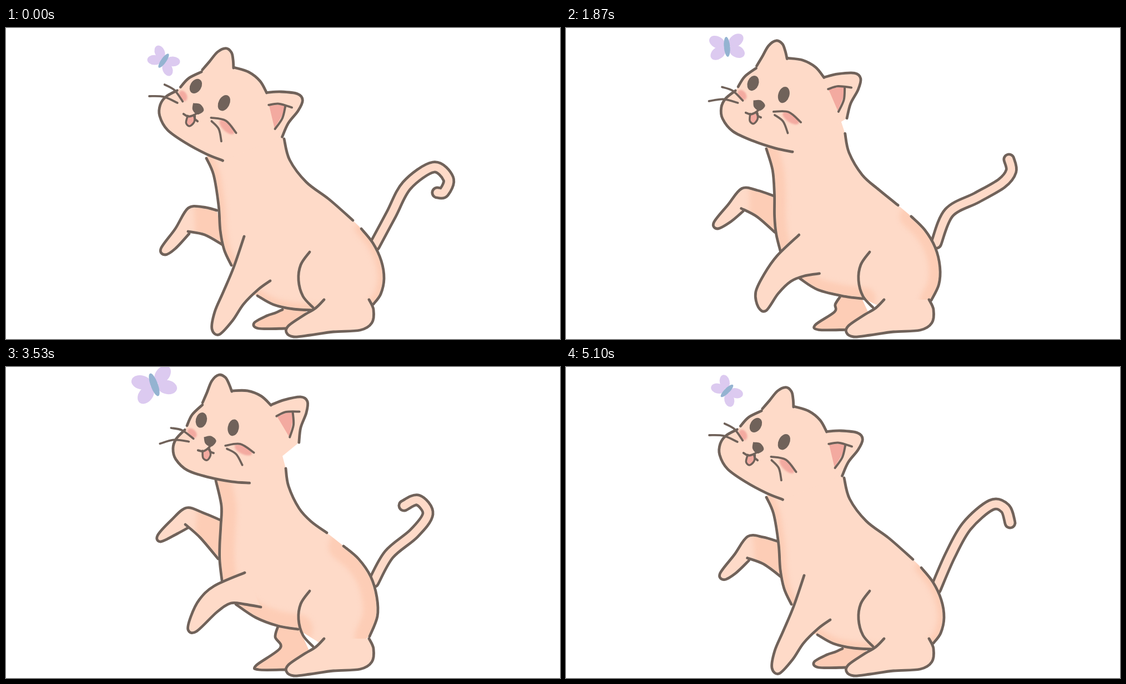
Recreate the animation shown at these times as an HTML page with a canvas. Size 998x561 px, loop 5210 ms.

```html
<!DOCTYPE html>
<html lang="en">
<head>
<meta charset="utf-8">
<title>Cat and butterfly</title>
<style>
  html, body { margin: 0; width: 100%; height: 100%; overflow: hidden; background: #fff; }
  canvas { display: block; }
</style>
</head>
<body>
<canvas id="stage" width="998" height="561"></canvas>
<script>
const ctx = document.getElementById('stage').getContext('2d');
const LINE = '#70625a', SKIN = '#fedac8', SHADE = '#fdcdb6', PINK = '#f3aaa0', WING = '#dccaf0', BUG = '#94b3d1';

// lift raises body, head and leg from sitting (0) to upright (1); paw raises the far arm.
// butterfly: x, y, degrees, scale.
const poses = {
  crouch: { lift: 0, paw: 0, butterfly: [284, 59, 35, 0.85],
    tail: '664,392 694,336 722,284 770,251 797,272 789,296 777,297' },
  sit: { lift: 0, paw: 0.27, butterfly: [290, 43, 45, 0.85],
    tail: '666,400 692,340 722,287 766,249 791,255 800,281' },
  rise: { lift: 0.57, paw: 0.5, butterfly: [290, 34, -5, 1],
    tail: '667,388 690,333 740,306 785,280 802,258 798,237' },
  reach: { lift: 1, paw: 1, butterfly: [267, 32, -20, 1.2],
    tail: '662,388 690,338 735,300 760,265 742,240 717,250' },
  stretch: { lift: 1.05, paw: 1.06, butterfly: [270, 34, -16, 1.2],
    tail: '662,388 690,337 736,299 760,263 742,239 718,249' }
};

// Key shapes for lift 0 and 1. "/" starts a new stroke, "~" marks points that shape only the fill.
const bodyKeys = [
  '501,200 511,238 541,278 582,309 625,347 / 640,362 661,388 676,420 681,452 675,480 662,498 / ~600,520 / 553,509 518,507 482,499 453,483 / ~440,480 / 406,428 393,400 386,365 383,320 374,265 361,235 / ~400,150 480,150',
  '504,183 509,215 528,255 550,279 578,299 / 608,323 635,346 657,378 668,415 669,450 655,486 / ~600,520 / 526,473 490,467 450,452 414,428 / ~400,420 / 389,385 385,350 385,320 387,285 388,250 378,205 / ~410,140 490,130'
];
const legKeys = [
  '476,456 454,472 428,498 408,528 384,553 371,543 376,512 391,477 410,432 429,376',
  '459,433 430,428 405,426 380,442 343,477 328,474 333,450 348,420 375,395 430,371'
];
const armKeys = [
  '380,329 355,323 328,325 305,362 279,398 287,409 305,398 330,371 / 328,367 358,373 390,391',
  '386,276 355,263 325,254 298,276 273,304 279,315 308,301 328,290 / 323,284 350,308 382,346'
];
const farHindKeys = [
  '498,508 485,514 470,519 447,532 455,542 503,542 / ~550,530 530,490',
  '490,468 485,487 494,507 451,538 455,546 504,546 / ~550,520 525,465'
];
const parse = text => text.split(' / ').map(segment => ({
  hidden: segment[0] === '~',
  points: segment.replace('~', '').split(' ').map(p => p.split(',').map(Number))
}));

// Smooth curve through the points, as path data.
function curve(points, start = 'M') {
  let d = start + points[0];
  for (let i = 0; i + 1 < points.length; i++) {
    const b = points[i], c = points[i + 1], a = points[i - 1] || b, e = points[i + 2] || c;
    const out = b.map((v, k) => v + (c[k] - a[k]) / 6);
    const into = c.map((v, k) => v - (e[k] - b[k]) / 6);
    d += `C${out} ${into} ${c}`;
  }
  return d;
}

function makePart(segments) {
  const fill = segments.map((s, i) => curve(s.points, i ? 'L' : 'M')).join('') + 'Z';
  const strokes = segments.filter(s => !s.hidden).map(s => new Path2D(curve(s.points)));
  return { fill: new Path2D(fill), strokes };
}

const still = text => makePart(parse(text));
const sway = lift => -40 * lift * (1 - lift);

// Blends two key shapes; the front of the cat leans forward halfway, the feet stay put.
function blend([low, high], t, lift = t) {
  const target = parse(high);
  return makePart(parse(low).map((segment, s) => ({
    ...segment,
    points: segment.points.map((point, i) => {
      const [x, y] = point.map((v, k) => v + (target[s].points[i][k] - v) * t);
      return [x < 470 && y < 500 ? x + sway(lift) : x, y];
    })
  })));
}

const foot = still('654,490 662,508 659,532 638,545 590,548 548,554 518,557 505,549 509,537 535,519 558,505 573,490');
const thigh = still('547,404 531,427 527,455 535,484 553,504');

// The head is drawn once, then moved and turned about its centre.
const HEAD_CENTRE = [409, 110];
const head = {
  outline: still('406,222 375,215 335,201 299,183 281,160 279,140 287,124 305,110 / 310,103 322,85 343,70 / 344,66 354,50 366,30 380,21 391,27 396,40 399,54 / 401,53 427,57 450,70 465,89 / 467,88 490,83 520,82 531,92 526,112 512,137 505,163'),
  earPink: still('473,111 502,109 489,150'),
  nose: still('337,128 350,128 358,138 348,147 338,140 337,128'),
  tongue: still('331,152 330,165 337,170 344,162 344,151'),
  marks: still('472,110 490,105 514,108 / 502,108 500,130 490,151 / 323,150 332,153 342,149 346,145 / 342,149 345,156 350,159'),
  whiskers: still('281,103 300,110 318,128 / 257,128 283,125 309,132 / 373,149 400,150 422,169 / 375,155 390,167 398,188')
};

function fill(part, color) {
  ctx.fillStyle = color;
  ctx.fill(part.fill);
}

function stroke(part, width = 4.8) {
  ctx.strokeStyle = LINE;
  ctx.lineWidth = width;
  part.strokes.forEach(path => ctx.stroke(path));
}

function shape(part, color = SKIN) {
  fill(part, color);
  stroke(part);
}

function ellipse(x, y, rx, ry, degrees, color) {
  ctx.fillStyle = color;
  ctx.beginPath();
  ctx.ellipse(x, y, rx, ry, degrees * Math.PI / 180, 0, 2 * Math.PI);
  ctx.fill();
}

// Soft shading along some strokes of a part, kept inside it and under its lines.
function shadeAlong(part, paths, width) {
  ctx.save();
  ctx.clip(part.fill);
  ctx.globalCompositeOperation = 'darken';
  ctx.filter = 'blur(4px)';
  ctx.strokeStyle = SHADE;
  ctx.lineWidth = width;
  paths.forEach(path => ctx.stroke(path));
  ctx.restore();
}

function drawButterfly(x, y, degrees, scale) {
  ctx.save();
  ctx.translate(x, y);
  ctx.rotate(degrees * Math.PI / 180);
  ctx.scale(scale, scale);
  for (const side of [-1, 1]) {
    for (const row of [-1, 1]) ellipse(17 * side, 10 * row, 15, 10.5, 32 * side * row, WING);
  }
  ellipse(0, 0, 5.5, 18, 0, BUG);
  ctx.restore();
}

function drawTail(text) {
  const path = new Path2D(curve(parse(text)[0].points));
  for (const [color, width] of [[LINE, 23], [SKIN, 13.5]]) {
    ctx.strokeStyle = color;
    ctx.lineWidth = width;
    ctx.stroke(path);
  }
}

function drawHead(lift) {
  ctx.save();
  ctx.translate(411 + 14 * lift + sway(lift), 129 - 31 * lift);
  ctx.rotate((9 - 17.5 * lift) * Math.PI / 180);
  ctx.translate(-HEAD_CENTRE[0], -HEAD_CENTRE[1]);
  shape(head.outline);
  fill(head.earPink, PINK);
  ctx.filter = 'blur(1.5px)';
  ellipse(317, 118, 7, 10, -35, PINK);
  ellipse(404, 161, 17, 8, 35, PINK);
  ctx.filter = 'none';
  ellipse(337, 97, 10, 14, 22, LINE);
  ellipse(392, 119, 10, 15, 18, LINE);
  fill(head.nose, LINE);
  fill(head.tongue, PINK);
  stroke(head.tongue, 3.5);
  stroke(head.marks, 4);
  stroke(head.whiskers, 3.8);
  ctx.restore();
}

function draw({ lift, paw, butterfly, tail }) {
  const body = blend(bodyKeys, lift), arm = blend(armKeys, paw, lift);
  const [, rump, belly, chest] = body.strokes;
  ctx.fillStyle = '#fff';
  ctx.fillRect(0, 0, 998, 561);
  ctx.lineCap = ctx.lineJoin = 'round';
  drawButterfly(...butterfly);
  drawTail(tail);
  shape(blend(farHindKeys, lift), SHADE);
  shape(arm);
  shadeAlong(arm, [chest], 90);
  shape(body);
  shadeAlong(body, [rump, belly, chest], 24 + 30 * lift);
  shape(foot);
  shape(blend(legKeys, lift));
  stroke(thigh);
  drawHead(lift);
}

// Five there-and-back swings on a 1/30 s grid; both end poses are held longer.
const LOOP = 5210, SWINGS = 5, SWING_TICKS = 31.25, STEP_TICKS = 3.6, EXTRA_HOLD = 1.08;
const swing = ['crouch', 'sit', 'rise', 'reach', 'stretch', 'reach', 'rise', 'sit'];
const schedule = [];
for (let n = 0; n < SWINGS; n++) {
  swing.forEach((name, i) => {
    const ticks = n * SWING_TICKS + i * STEP_TICKS + Math.ceil(i / 4) * EXTRA_HOLD;
    schedule.push({ time: Math.round(Math.ceil(ticks) * 10 / 3) * 10, pose: poses[name] });
  });
}

let shown;
function tick() {
  const time = performance.now() % LOOP;
  const { pose } = schedule.findLast(step => step.time <= time);
  if (pose !== shown) draw(shown = pose);
  requestAnimationFrame(tick);
}
tick();
</script>
</body>
</html>
```
